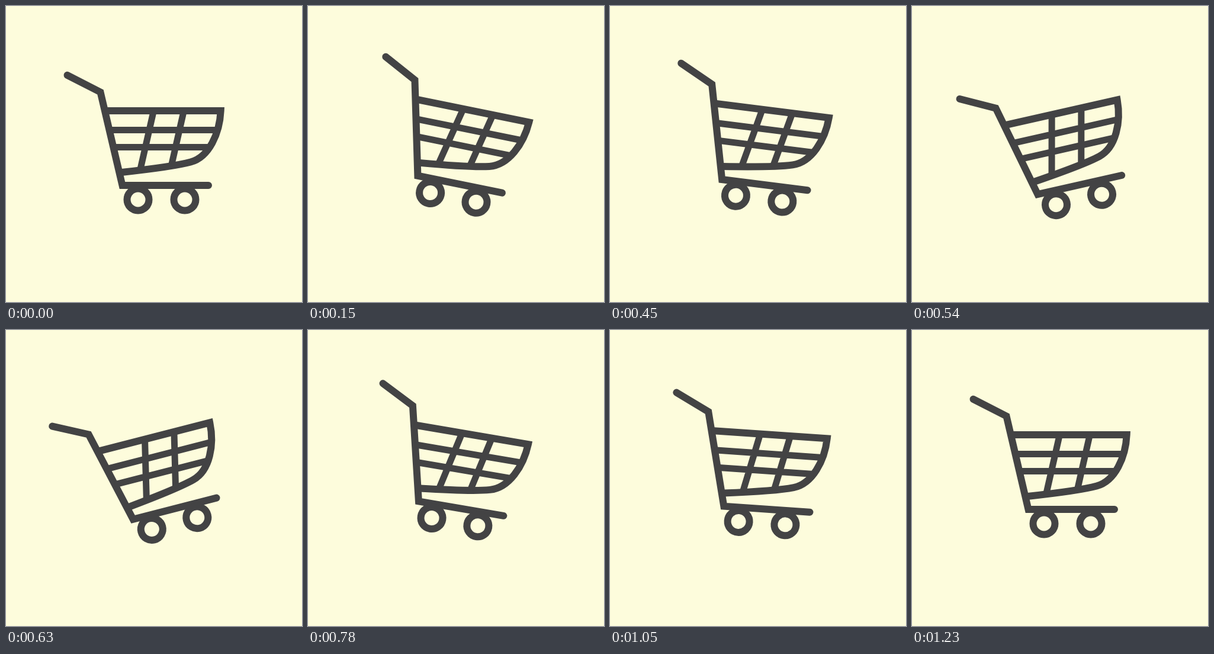
An HTML page with a canvas that plays this animation: 500 by 500 pixels, repeating every 1.53 s.

```html
<!DOCTYPE html>
<html lang="en">
<head>
<meta charset="utf-8">
<title>Swinging cart</title>
<style>
  html, body { margin: 0; width: 100%; height: 100%; overflow: hidden; background: #fdfcdc; }
  canvas { display: block; width: 500px; height: 500px; }
</style>
</head>
<body>
<canvas id="stage"></canvas>
<script>
const SIZE = 500, LOOP = 1530, STEP = 30, LAST_STEP = 41;
const PAPER = '#fdfcdc', INK = '#434344';
const PIVOT = { x: 272, y: 239.6 };

// Turning points of the damped swing: [step, degrees]
const SWING = [
  [0, 0], [10.4, 25.3], [20, -15], [26.8, 10],
  [32, -7], [36, 5], [39, -3], [41, 0]
];

const frame = new Path2D('M103.5 116.8 L159.5 145.5 L196.5 303 H342');
const basket = new Path2D(
  'M167 177 H362.7 C361 215 343 255 312 263.5 C290 269.5 250 275 195 281');
const grid = new Path2D(
  'M174 209.5 H357 M181 238.5 H344 M249.4 177 L227 275.5 M300.4 177 L279.5 269');
const wheels = [[223, 327], [302, 327]];

const canvas = document.getElementById('stage');
const ctx = canvas.getContext('2d');
const ratio = window.devicePixelRatio || 1;
canvas.width = canvas.height = SIZE * ratio;

function ease(u) {
  return u < 0.5 ? 0.5 * (2 * u) ** 2.5 : 1 - 0.5 * (2 - 2 * u) ** 2.5;
}

function angleAt(step) {
  const i = SWING.findIndex(([end]) => end >= step);
  if (i <= 0) return 0;
  const [t0, a0] = SWING[i - 1], [t1, a1] = SWING[i];
  return a0 + (a1 - a0) * ease((step - t0) / (t1 - t0));
}

function stroke(path, width, cap) {
  ctx.lineWidth = width;
  ctx.lineCap = cap;
  ctx.stroke(path);
}

function drawCart() {
  ctx.strokeStyle = INK;
  ctx.lineJoin = 'miter';
  stroke(frame, 12, 'round');
  stroke(basket, 12, 'butt');
  stroke(grid, 11, 'butt');
  for (const [x, y] of wheels) {
    const rim = new Path2D();
    rim.arc(x, y, 18.5, 0, Math.PI * 2);
    stroke(rim, 12, 'butt');
  }
}

function render(now) {
  const step = Math.min(LAST_STEP, Math.floor((now % LOOP) / STEP));
  ctx.setTransform(ratio, 0, 0, ratio, 0, 0);
  ctx.fillStyle = PAPER;
  ctx.fillRect(0, 0, SIZE, SIZE);
  ctx.translate(PIVOT.x, PIVOT.y);
  ctx.rotate(angleAt(step) * Math.PI / 180);
  ctx.translate(-PIVOT.x, -PIVOT.y);
  drawCart();
}

const start = performance.now();
function tick() {
  render(performance.now() - start);
  requestAnimationFrame(tick);
}
tick();
</script>
</body>
</html>
```
